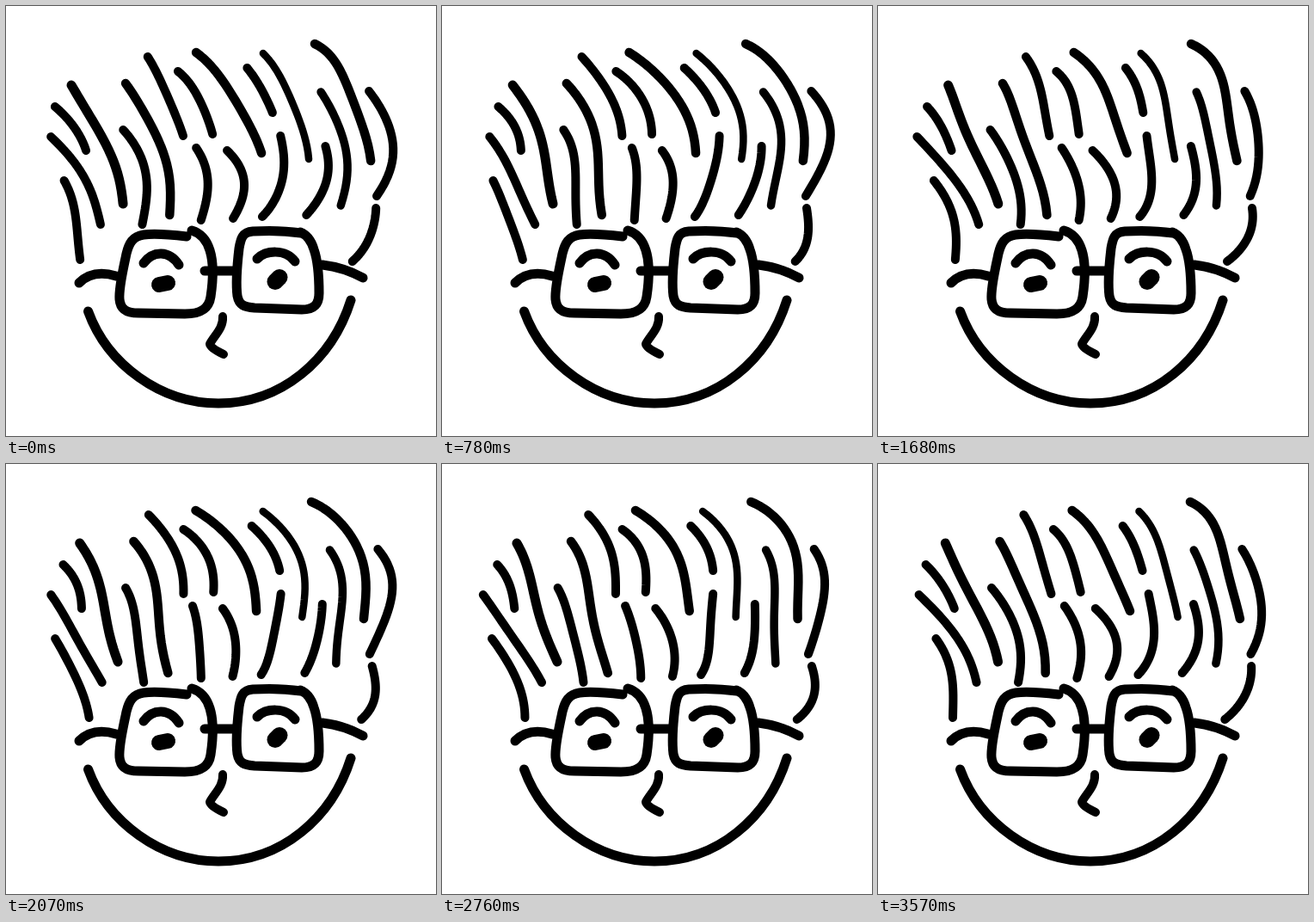
Recreate the animation shown at these times as an HTML page. Size 500x500 px, loop 3.6 s.

```html
<!DOCTYPE html>
<html lang="en">
<head>
<meta charset="utf-8">
<title>Waving hair</title>
<style>
  html, body { margin: 0; width: 100%; height: 100%; overflow: hidden; background: #fff; }
  svg { display: block; width: 100vw; height: 100vh; }
  path { fill: none; stroke: #000; stroke-linecap: round; stroke-linejoin: round; }
</style>
</head>
<body>
<svg viewBox="0 0 500 500">
  <g id="hair"></g>
  <g stroke-width="11">
    <path d="M95.500 355C118 417 180 462 247 462C320 462 379 412 401 342"/>
    <path d="M85 322Q101 306 128 314"/>
    <path d="M368 301Q393 304 415 316"/>
    <path d="M231 308H268"/>
    <path d="M210 268C193 266 175 264 160 266C147 268 143 276 140 288C137 303 131 327 132 341C133 354 142 357 154 357L208 358C226 358 236 352 238 338C241 318 242 300 237 284C233 271 226 264 216 261"/>
    <path d="M343 264C323 261 304 261 287 262C275 263 273 270 271 282C269 299 267 322 269 337C271 348 277 350 289 351L344 353C358 353 364 347 364 334C364 316 363 297 358 283C355 273 350 266 342 263"/>
    <path d="M160 299C171 284 190 284 201 301"/>
    <path d="M292 294C302 284 325 282 336 297"/>
    <path stroke-width="10" d="M252 361C253 375 242 383 237 393Q238 398 253 405"/>
    <path stroke-width="18" d="M178 324L188 322"/>
    <path stroke-width="19" d="M313 320.500L318 315.500"/>
  </g>
</svg>
<script>
  const LOOP = 3600, STEP = 30;
  const AMP = 5.5, WAVELENGTH = 193, PERIOD = 609, Y0 = 46;

  // start, middle and end of each strand at rest, then its width
  const strands = [
    [61, 117, 79, 140, 89, 168, 10],
    [81.5, 92, 109, 150, 134.5, 230, 11],
    [50.5, 152, 86, 200, 112.5, 254, 10],
    [62.5, 203, 82, 245, 91.5, 295, 10],
    [167, 59, 191, 100, 204.5, 151, 10],
    [144.5, 90, 173, 150, 191, 243, 10.5],
    [136, 144, 156, 190, 161, 254, 10],
    [204.5, 76, 228, 105, 239, 149, 10],
    [222.5, 54, 266, 100, 292.7, 171, 10.5],
    [284.5, 72, 302, 96, 313, 124, 10],
    [300.5, 55, 335, 105, 347, 178, 8.5],
    [358.6, 44, 401, 90, 419, 180, 10.5],
    [371.5, 100, 390, 155, 388, 232, 9.5],
    [427.5, 99, 447, 155, 428, 221, 10],
    [429.5, 235, 427, 270, 408, 297, 10],
    [217.5, 165, 229.5, 203, 228.5, 249, 10],
    [253, 168, 272, 205, 265.5, 247, 10],
    [317.7, 151, 315, 208, 299, 245, 10],
    [368, 163, 367, 206, 350, 243, 10]
  ];

  const hair = document.getElementById("hair");
  const paths = strands.map(s => {
    const path = document.createElementNS("http://www.w3.org/2000/svg", "path");
    path.setAttribute("stroke-width", s[6]);
    return hair.appendChild(path);
  });

  const sway = (y, t) =>
    -AMP * Math.sin(2 * Math.PI * (t / PERIOD + (y - Y0) / WAVELENGTH));

  // quadratic through a, m, b
  const curve = (a, m, b, u) => {
    const c = 2 * m - (a + b) / 2, v = 1 - u;
    return v * v * a + 2 * u * v * c + u * u * b;
  };

  function strandPath([x0, y0, x1, y1, x2, y2], t) {
    const points = [];
    for (let i = 0; i <= 24; i++) {
      const y = curve(y0, y1, y2, i / 24);
      const x = curve(x0, x1, x2, i / 24) + sway(y, t);
      points.push(x.toFixed(2) + " " + y.toFixed(2));
    }
    return "M" + points.join("L");
  }

  function draw(t) {
    strands.forEach((s, i) => paths[i].setAttribute("d", strandPath(s, t)));
  }

  const start = performance.now();
  function tick() {
    const t = (performance.now() - start) % LOOP;
    draw(Math.floor(t / STEP) * STEP);
    requestAnimationFrame(tick);
  }
  tick();
</script>
</body>
</html>
```
